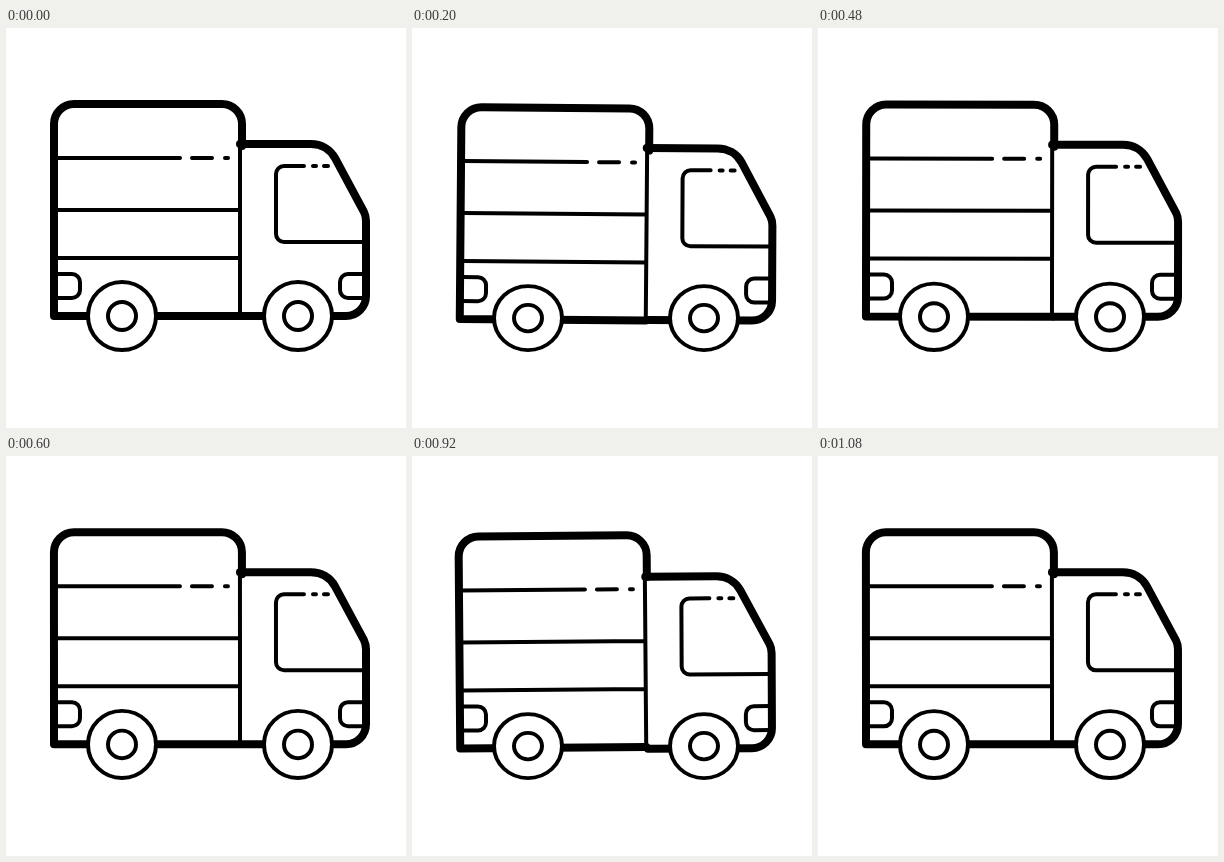
These frames come from a looping animation (400 px wide and 400 px high, 1.12 s). An HTML page with a canvas:

```html
<!DOCTYPE html>
<html>
<head>
<meta charset="utf-8">
<style>
  html, body { margin: 0; width: 100%; height: 100%; overflow: hidden; background: #fff; }
  canvas { display: block; width: 400px; height: 400px; }
</style>
</head>
<body>
<canvas id="stage"></canvas>
<script>
const LOOP = 1120, HALF = LOOP / 2, STEP = 40;
const DIP = 240;        // lowest point of a bounce
const DROP = 4.7;       // px the body sinks
const BOX_TILT = 0.5, CAB_TILT = 0.28;  // degrees
const SQUASH = 0.06;

const canvas = document.getElementById('stage');
const ctx = canvas.getContext('2d');
const dpr = window.devicePixelRatio || 1;
canvas.width = canvas.height = 400 * dpr;

const boxFrame = new Path2D('M236 118V96A20 20 0 0 0 216 76H68A20 20 0 0 0 48 96V288H234');
const boxLines = new Path2D(
  'M50 130H174M186 130H206M219 130H222M50 182H233M50 230H233' +
  'M50 246H66A8 8 0 0 1 74 254V262A8 8 0 0 1 66 270H50M234 118V288');
const cabFrame = new Path2D(
  'M234 116H305C315 116 324 121 329 130L358 184Q360 188 360 193V268A20 20 0 0 1 340 288H236');
const cabLines = new Path2D(
  'M298 138H278A8 8 0 0 0 270 146V206A8 8 0 0 0 278 214H358' +
  'M307 138H310M318 138H322' +
  'M358 246H342A8 8 0 0 0 334 254V262A8 8 0 0 0 342 270H358');

const smooth = u => u * u * (3 - 2 * u);

// Sink depth 0..1; the second bounce mirrors the first in time.
function pose(t) {
  const back = t >= HALF;
  const u = back ? LOOP - t : t;
  const depth = u < DIP ? smooth(u / DIP) : smooth((HALF - u) / (HALF - DIP));
  return { depth, side: back ? -1 : 1 };
}

function part(frame, lines, px, py, dy, deg) {
  ctx.save();
  ctx.translate(px, py + dy);
  ctx.rotate(deg * Math.PI / 180);
  ctx.translate(-px, -py);
  ctx.lineWidth = 4;
  ctx.stroke(lines);
  ctx.lineWidth = 8;
  ctx.stroke(frame);
  ctx.restore();
}

function wheel(x, squash) {
  ctx.save();
  ctx.translate(x, 324);
  ctx.scale(1, 1 - squash);
  ctx.lineWidth = 4;
  for (const r of [34, 14]) {
    ctx.beginPath();
    ctx.arc(0, -36, r, 0, Math.PI * 2);
    ctx.fill();
    ctx.stroke();
  }
  ctx.restore();
}

function draw(t) {
  const { depth, side } = pose(t);
  ctx.setTransform(dpr, 0, 0, dpr, 0, 0);
  ctx.fillStyle = '#fff';
  ctx.strokeStyle = '#000';
  ctx.lineCap = ctx.lineJoin = 'round';
  ctx.fillRect(0, 0, 400, 400);
  part(boxFrame, boxLines, 142, 260, depth * DROP * 0.88, depth * side * BOX_TILT);
  ctx.lineCap = 'round';
  part(cabFrame, cabLines, 298, 280, depth * DROP, depth * side * CAB_TILT);
  const squash = SQUASH * Math.sqrt(depth);
  wheel(116, squash);
  wheel(292, squash);
}

const start = performance.now();
function tick() {
  const t = (performance.now() - start) % LOOP;
  draw(Math.floor(t / STEP) * STEP);
  requestAnimationFrame(tick);
}
tick();
</script>
</body>
</html>
```
